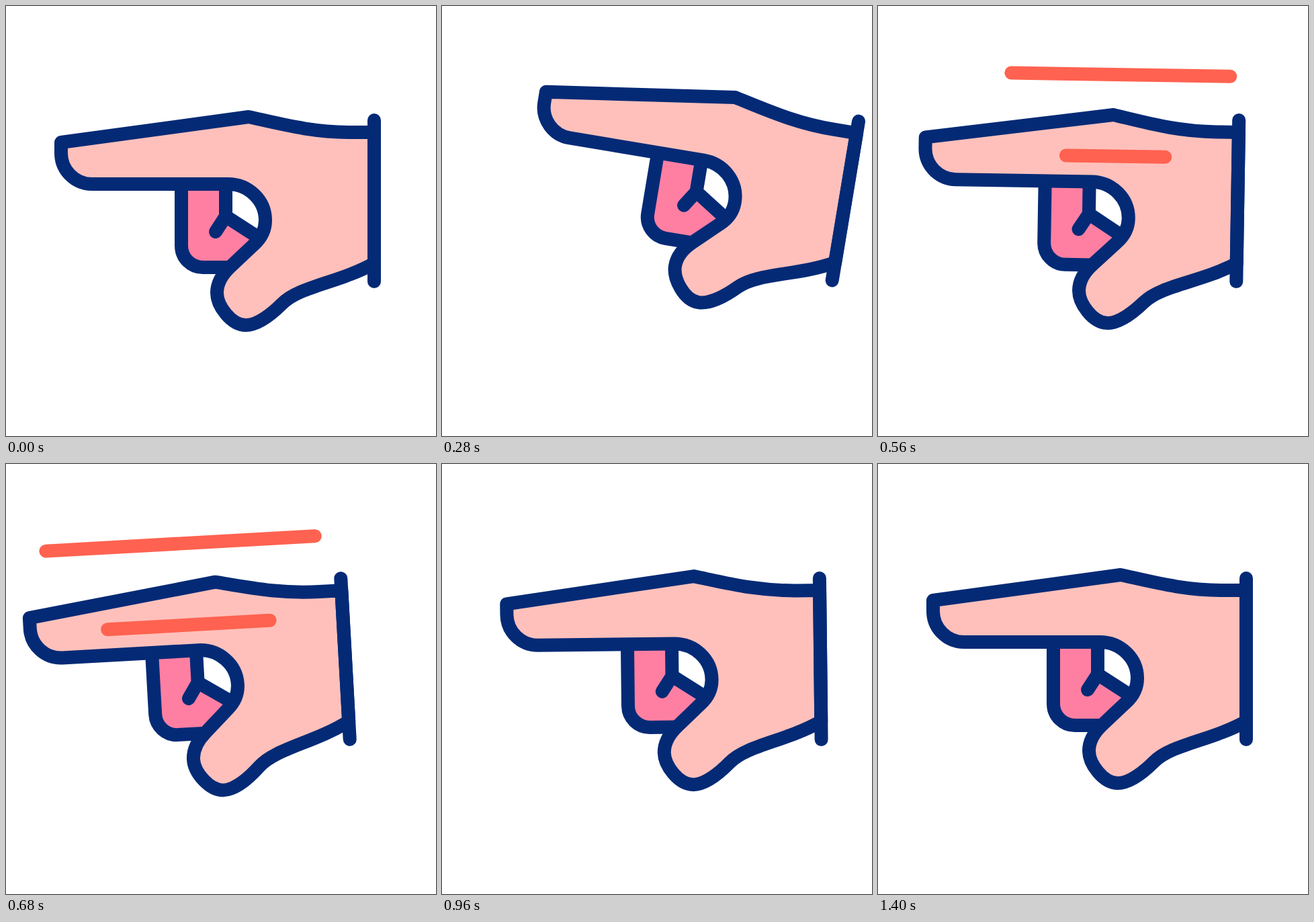
These frames come from a looping animation (640x640 px, 2 s). An HTML page:

```html
<!DOCTYPE html>
<html lang="en">
<head>
<meta charset="utf-8">
<title>Pointing hand</title>
<style>
  html, body { margin: 0; width: 100%; height: 100%; overflow: hidden; background: #fff; }
  svg { display: block; width: 100%; height: 100%; }
  .ink { stroke: #042a76; }
  .ink, .streak { stroke-width: 20; stroke-linecap: round; stroke-linejoin: round; }
  .streak { stroke: #ff6250; }
  .butt { stroke-linecap: butt; }
</style>
</head>
<body>
<svg viewBox="0 0 640 640" fill="none">
  <g id="hand">
    <path fill="#ff7fa2" d="M261 265H327V313L377 345L330 389H293A32 32 0 0 1 261 357Z"/>
    <path class="ink butt" d="M261 265V357A32 32 0 0 0 293 389H330"/>
    <path class="ink" d="M327 265V313L312 336M327 313L375 344"/>
    <path class="ink" fill="#ffc0bb" d="M548 188H515C455 188 411 176 361 165L82 203V219A46 46 0 0 0 128 265H330
      C361 265 386 289 386 319C386 334 379 346 369 355L334 388C320 401 314 413 314 427
      C314 446 335 475 357 475C375 475 397 457 411 443C437 417 496 412 548 383Z"/>
    <path class="ink" d="M548 170V410"/>
    <path class="streak" id="upper"/>
    <path class="streak" id="lower"/>
  </g>
</svg>
<script>
const LOOP = 2000, STEP = 40;
const byId = id => document.getElementById(id);
const hand = byId('hand');

// Keys: [time, shift, tilt]
const keys = [
  [0, 0, 0], [367, 61, 11], [667, -43, -3.2],
  [697, -43, -3.2], [1067, 30, 0], [1400, 0, 0]
];

// Each streak runs leftwards from x; head and tail are [start, end] times
const streaks = [
  { el: byId('upper'), x: 534, y: 105, len: 422, head: [341, 658], tail: [644, 911] },
  { el: byId('lower'), x: 439, y: 226.6, len: 246, head: [369, 706], tail: [690, 957] }
];

function ease(t, a, b) {
  const u = Math.min(1, Math.max(0, (t - a) / (b - a)));
  return u * u * (3 - 2 * u);
}

function pose(t, col) {
  let v = keys[0][col];
  for (let i = 1; i < keys.length; i++) {
    const a = keys[i - 1], b = keys[i];
    v += (b[col] - a[col]) * ease(t, a[0], b[0]);
  }
  return v;
}

function drawStreak(s, t) {
  const head = s.len * ease(t, ...s.head);
  const tail = s.len * ease(t, ...s.tail);
  s.el.setAttribute('d', head - tail > 0.1
    ? `M${s.x - tail} ${s.y}H${s.x - head}` : '');
}

function draw(t) {
  hand.setAttribute('transform',
    `translate(${pose(t, 1)}) rotate(${pose(t, 2)} 548 290)`);
  streaks.forEach(s => drawStreak(s, t));
}

function tick() {
  draw(Math.floor(performance.now() % LOOP / STEP) * STEP);
  requestAnimationFrame(tick);
}
tick();
</script>
</body>
</html>
```
